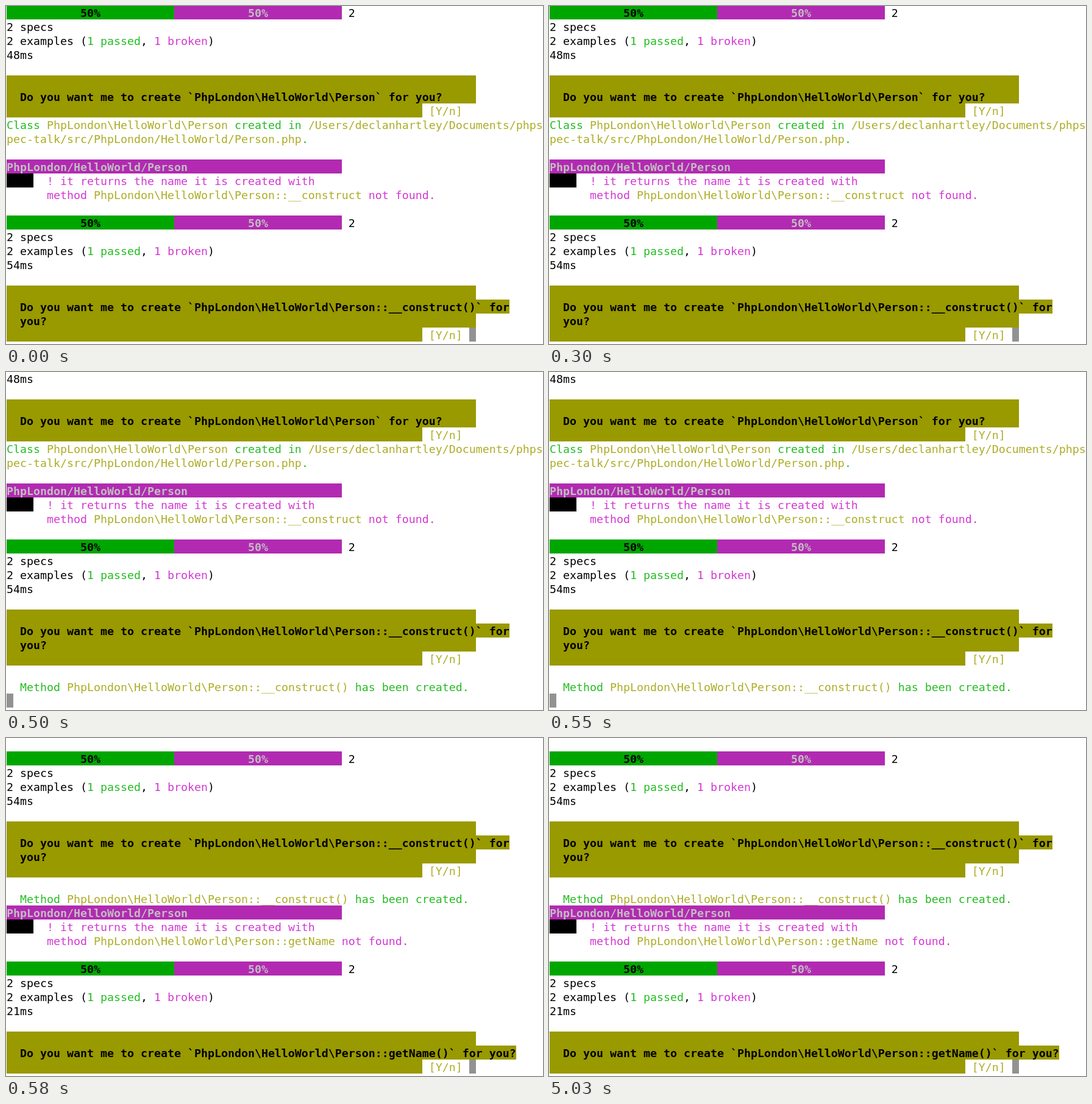
Animation of 881 by 555 pixels, one loop 8 s. Source, as an HTML page:

```html
<!DOCTYPE html>
<html lang="en">
<head>
<meta charset="utf-8">
<title>Spec run in a terminal</title>
<style>
  html, body { margin: 0; width: 100%; height: 100%; overflow: hidden; background: #fff; }
  #screen {
    position: absolute; inset: 0; overflow: hidden; color: #000;
    font: 18.271px "DejaVu Sans Mono", monospace; font-variant-ligatures: none;
  }
  #log { position: absolute; left: 1px; top: -1px; }
  .row { height: 23px; white-space: pre; }
  .row span { display: inline-block; vertical-align: top; height: 23px; line-height: 25px; }
  .green { color: #25bc24; }
  .yellow { color: #adad27; }
  .pink { color: #d338d3; }
  .pass, .fail, .ask { font-weight: bold; }
  .pass { background: #00a600; }
  .fail { background: #b22ab2; color: #bfbfbf; }
  .ask { background: #990; }
  .mark { background: #000; }
  #cursor { position: absolute; width: 11px; height: 23px; background: #929292; }
</style>
</head>
<body>
<div id="screen"><div id="log"></div><div id="cursor"></div></div>
<script>
const LOOP = 8000, ROWS = 24, CELL_W = 11, CELL_H = 23;
const PERSON = 'PhpLondon\\HelloWorld\\Person';

// A row is a list of [style, text] runs.
const blank = [];
const plain = text => [['', text]];

const header = [['fail', 'PhpLondon/HelloWorld/Person'.padEnd(50)]];

const failure = method => [
  header,
  [['mark', '    '], ['pink', '  ! it returns the name it is created with']],
  [['pink', '      method '], ['yellow', `${PERSON}::${method}`], ['pink', ' not found.']],
  blank
];

const summary = time => {
  const half = ' '.repeat(11) + '50%' + ' '.repeat(11);
  return [
    [['pass', half], ['fail', half], ['', ' 2']],
    plain('2 specs'),
    [['', '2 examples ('], ['green', '1 passed'], ['', ', '], ['pink', '1 broken'], ['', ')']],
    plain(time),
    blank
  ];
};

const question = (...lines) => [
  ...['', ...lines].map(s => [['ask', (s && '  ' + s).padEnd(70)]]),
  [['ask', ' '.repeat(62)], ['yellow', ' [Y/n]']]
];

const rows = [
  ...summary('48ms'),
  ...question(`Do you want me to create \`${PERSON}\` for you?`),
  [['green', 'Class '], ['yellow', PERSON], ['green', ' created in '],
   ['yellow', '/Users/declanhartley/Documents/phps']],
  [['yellow', 'pec-talk/src/PhpLondon/HelloWorld/Person.php'], ['green', '.']],
  blank,
  ...failure('__construct'),
  ...summary('54ms'),
  ...question(`Do you want me to create \`${PERSON}::__construct()\` for`, 'you?'),
  blank,
  [['green', '  Method '], ['yellow', `${PERSON}::__construct()`], ['green', ' has been created.']],
  ...failure('getName'),
  ...summary('21ms'),
  ...question(`Do you want me to create \`${PERSON}::getName()\` for you?`)
];

// The cursor always sits on the bottom row of the window.
const steps = [
  { at: 0, line: 23, col: 69 },
  { at: 500, line: 26, col: 0 },
  { at: 580, line: 37, col: 69 }
];

const log = document.getElementById('log');
const cursor = document.getElementById('cursor');
cursor.style.top = (ROWS - 1) * CELL_H - 1 + 'px';

const rowEls = rows.map(runs => {
  const row = document.createElement('div');
  row.className = 'row';
  for (const [style, text] of runs) {
    const span = document.createElement('span');
    span.className = style;
    span.textContent = text;
    row.append(span);
  }
  log.append(row);
  return row;
});

function show({ line, col }) {
  log.style.top = (ROWS - 1 - line) * CELL_H - 1 + 'px';
  cursor.style.left = 1 + col * CELL_W + 'px';
  rowEls.forEach((el, i) => {
    const printed = i < line || (i === line && col > 0);
    el.style.visibility = printed ? 'visible' : 'hidden';
  });
}

let current;
const start = performance.now();
function tick() {
  const t = (performance.now() - start) % LOOP;
  const step = steps.findLast(s => s.at <= t);
  if (step !== current) show(current = step);
  requestAnimationFrame(tick);
}
tick();
</script>
</body>
</html>
```
